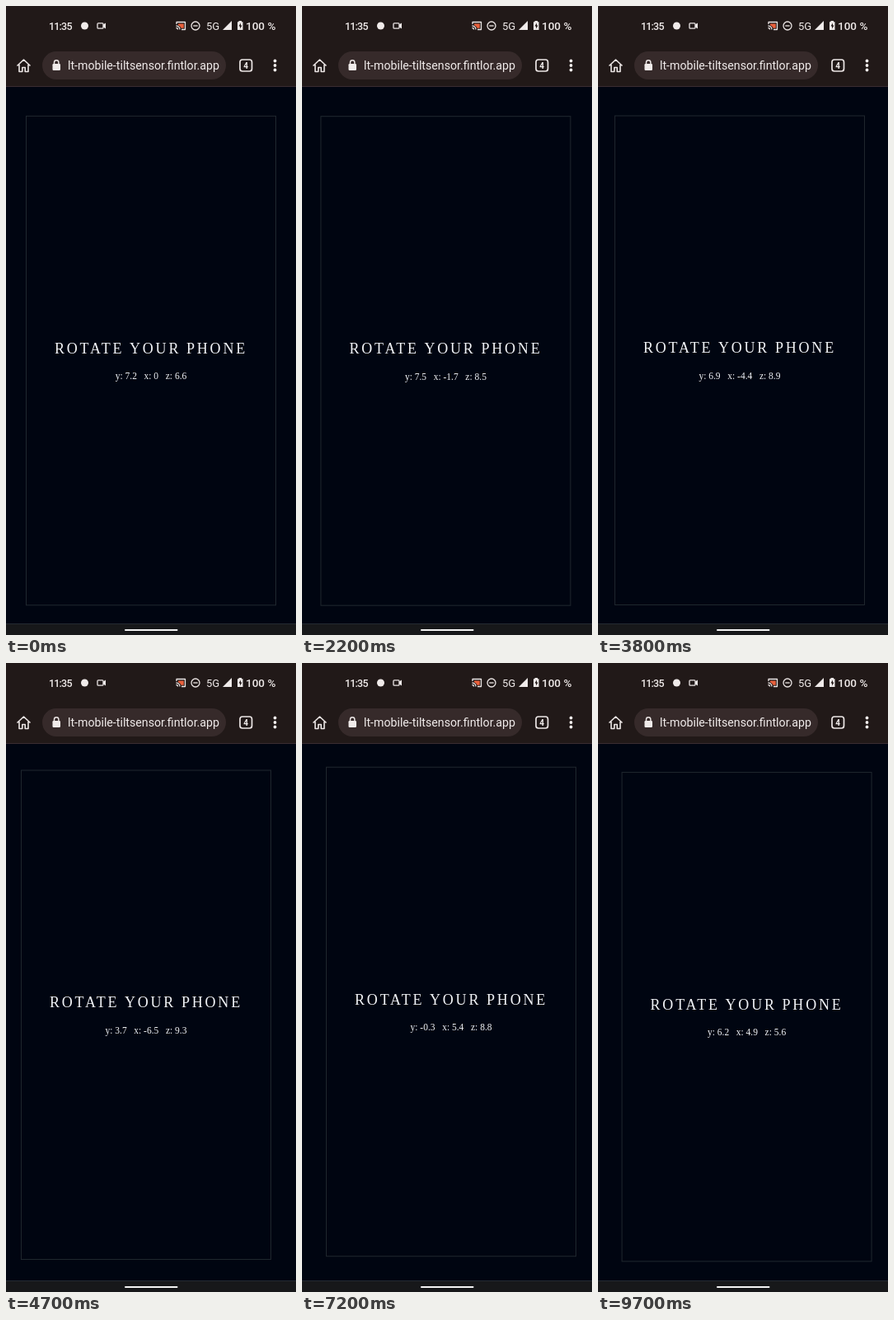
An HTML page that plays this animation: 352 by 762 pixels, repeating every 9.8 s.

```html
<!DOCTYPE html>
<html lang="en">
<head>
<meta charset="utf-8">
<title>Rotate your phone</title>
<style>
  html, body { margin: 0; width: 100%; height: 100%; overflow: hidden; background: #000511; }
  svg { display: block; width: 352px; height: 762px; }
  .ui { font-family: Roboto, sans-serif; fill: #f0ebea; }
  .line { fill: none; stroke: #ece6e5; stroke-width: 1.3; stroke-linejoin: round; }
  .serif { font-family: "Liberation Serif", serif; fill: #f1f3f6; }
</style>
</head>
<body>
<svg viewBox="0 0 352 762">
  <clipPath id="page"><rect y="98" width="352" height="650"/></clipPath>
  <rect width="352" height="762" fill="#000511"/>

  <g clip-path="url(#page)">
    <g id="card">
      <rect x="24.5" y="126.5" width="303" height="592.5" fill="none" stroke="#20282f"/>
      <text class="serif" y="413.8" font-size="18" letter-spacing="2.8">
        <tspan x="59">ROTATE</tspan><tspan x="150">YOUR</tspan><tspan x="219">PHONE</tspan>
      </text>
      <text class="serif" id="readout" x="176" y="445.5" font-size="11.5" text-anchor="middle"></text>
    </g>
  </g>

  <rect width="352" height="97" fill="#211918"/>
  <rect y="97" width="352" height="1" fill="#3a2c31"/>
  <rect x="44" y="55" width="223" height="34" rx="17" fill="#362a2a"/>

  <g class="ui">
    <text x="52" y="28.5" font-size="12.5" font-weight="500" letter-spacing="-.8">11:35</text>
    <circle cx="95.5" cy="24" r="4.5"/>
    <path d="M118 22.5l3-2v7l-3-2z"/>
    <text x="243" y="28.5" font-size="13">5G</text>
    <path d="M263 29h11V18z"/>
    <path d="M282.5 18v1.3H281V29h6.500v-9.700H286V18z"/>
    <path d="M285 20.500l-2.500 4h1.500v3l2.500-4H285z" fill="#211918"/>
    <text x="291" y="28.5" font-size="13.5" font-weight="500">100 %</text>
    <rect x="56.5" y="70" width="9.5" height="8" rx="1.2"/>
    <text x="259" y="77.2" font-size="14.2" text-anchor="end">lt-mobile-tiltsensor.fintlor.app</text>
    <text x="291" y="75.7" font-size="10" font-weight="700" text-anchor="middle">4</text>
    <circle cx="326.5" cy="66.5" r="1.9"/>
    <circle cx="326.5" cy="72" r="1.9"/>
    <circle cx="326.5" cy="77.5" r="1.9"/>
  </g>

  <g class="line">
    <rect x="111" y="20.8" width="7" height="6.4" rx="1"/>
    <path d="M207 22v-2.500h10.500v9H213M206.500 24a4.500 4.500 0 0 1 4.500 4.500M206.500 26.500a2 2 0 0 1 2 2"/>
    <circle cx="230" cy="24" r="5"/>
    <path d="M227.300 24h5.400"/>
    <path d="M13.500 72.500L21.500 65l8 7.500M16 71v8.500h3.800v-5h3.400v5H27V71" stroke-width="1.6"/>
    <path d="M58.500 70.500v-2a2.700 2.700 0 0 1 5.400 0v2" stroke-width="1.5"/>
    <rect x="284" y="65" width="14.5" height="14" rx="3" stroke-width="1.7"/>
  </g>
  <path d="M209 21.500h6.800v5.200h-3.300a6 6 0 0 0-3.500-3.500z" fill="#e8603c"/>

  <rect y="748" width="352" height="14" fill="#17181a"/>
  <rect y="748" width="352" height="1" fill="#252b33"/>
  <rect x="144" y="755" width="64.5" height="2" rx="1" fill="#f4f4f4"/>
</svg>
<script>
  const LOOP = 9800, STEP = 100, SWING = 5;
  // Key tilts of the phone; it swings sideways on the way from one to the next
  const poses = [
    { t: 0, x: 0, y: 7.2, z: 6.6 },
    { t: 1400, x: -2.5, y: 5.6, z: 8.5 },
    { t: 3000, x: -0.9, y: 9.5, z: 8.5 },
    { t: 4700, x: -6.5, y: 3.7, z: 9.3 },
    { t: 6100, x: 1.6, y: 2.8, z: 9.3 },
    { t: 7200, x: 5.4, y: -0.3, z: 8.8 },
    { t: 9700, x: 4.9, y: 6.2, z: 5.6 }
  ];
  const card = document.getElementById('card');
  const readout = document.getElementById('readout');

  function tiltAt(t) {
    const next = Math.max(1, poses.findIndex(pose => pose.t >= t));
    const a = poses[next - 1], b = poses[next];
    const p = (t - a.t) / (b.t - a.t);
    const eased = p * p * (3 - 2 * p);
    const mix = axis => a[axis] + (b[axis] - a[axis]) * eased;
    return { x: mix('x') - SWING * Math.sin(2 * Math.PI * p), y: mix('y'), z: mix('z') };
  }

  function draw(time) {
    const tilt = tiltAt(Math.floor(time % LOOP / STEP) * STEP);
    card.setAttribute('transform', `translate(${tilt.x * 0.93} ${tilt.y * 0.95})`);
    readout.textContent = ['y', 'x', 'z']
      .map(axis => `${axis}: ${+tilt[axis].toFixed(1)}`)
      .join('\u00a0\u00a0\u00a0');
  }

  const start = performance.now();
  function tick() {
    draw(performance.now() - start);
    requestAnimationFrame(tick);
  }
  tick();
</script>
</body>
</html>
```
